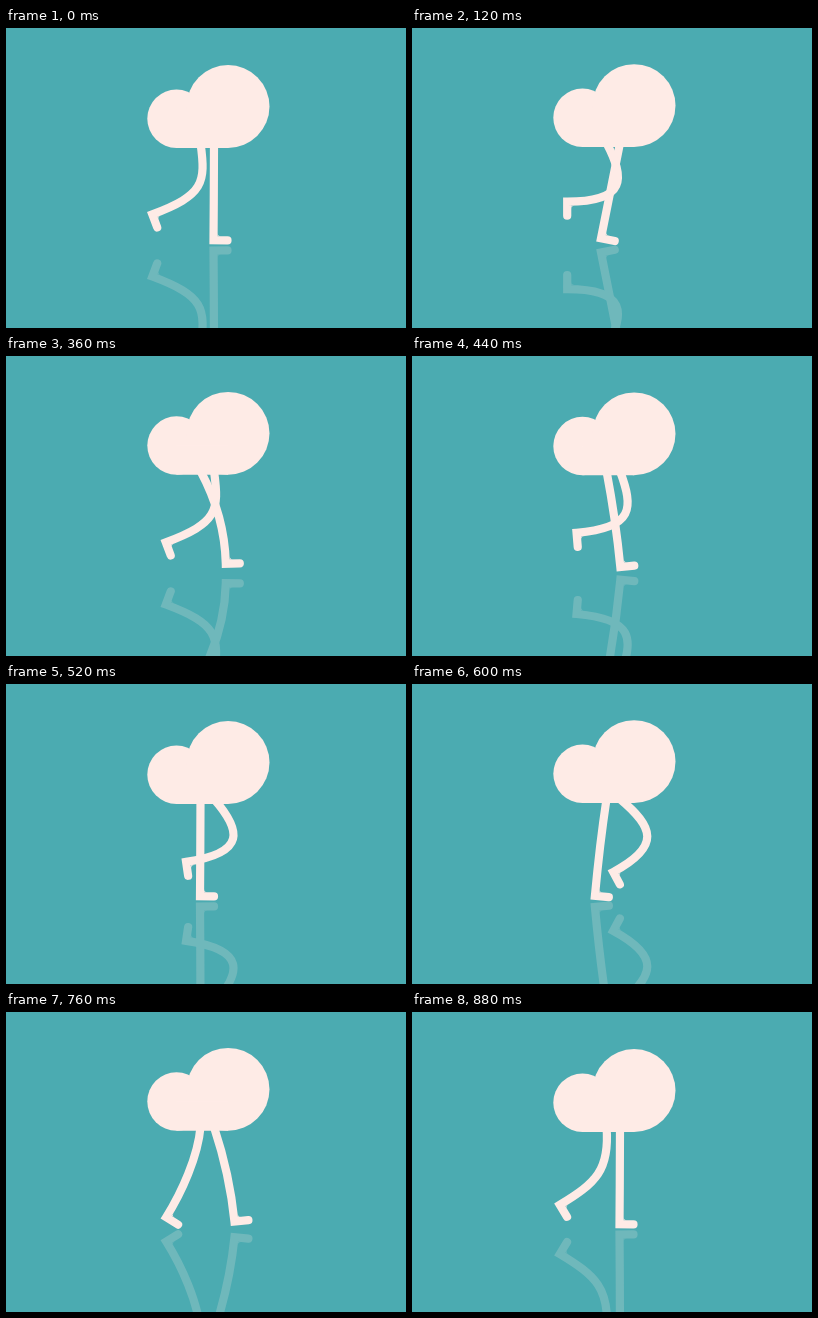
Write an HTML page that moves like this. It is 400x300 px and loops after 920 ms.

```html
<!DOCTYPE html>
<html lang="en">
<head>
<meta charset="utf-8">
<title>Walking cloud</title>
<style>
  html, body { margin: 0; width: 100%; height: 100%; overflow: hidden; background: #4babb1; }
  svg { display: block; width: 100%; height: 100%; }
  .limb { fill: none; stroke: #feebe6; stroke-width: 8.2; stroke-linecap: round; stroke-linejoin: miter; }
  .fill { fill: #feebe6; }
</style>
</head>
<body>
<svg viewBox="0 0 400 300">
  <use href="#legs" transform="translate(0 434.8) scale(1 -1)" opacity=".2"/>
  <g id="legs">
    <path class="limb"/><path class="fill"/>
    <path class="limb"/><path class="fill"/>
  </g>
  <g id="cloud" class="fill">
    <circle cx="170.5" cy="90.7" r="29.2"/>
    <circle cx="222.1" cy="78.5" r="41.4"/>
    <path d="M170.5 91H222V119.9H170.5Z"/>
  </g>
</svg>
<script>
const LOOP = 920, STEP = 40, HIP_Y = 115, HALF = 4.1, TOE = 14, FILLET = 3.2;

// Leg curve relative to the hip: two control points, then the ankle.
const poses = [
  [0, 32, -.3, 65, -.5, 97.3],        // upright
  [-6.3, 32, -12.7, 63.5, -19, 95.3], // leaning back
  [-1, 30, -19, 65, -38.2, 88],       // push off
  [3.5, 43, -10.5, 56, -46.7, 77.8],  // heel up
  [5.5, 40, 3.5, 52, -48.2, 71.3],    // trailing
  [18.5, 35, 20.5, 58.7, -39.3, 58.7],// knee forward
  [27, 31, 33, 54, -27.9, 62.9],
  [33.5, 28, 41.5, 47, -6.8, 73],     // passing
  [30, 25, 40, 45, 15.1, 85.4],       // reaching
  [14.5, 27, 24.5, 57, 25.3, 92.7]    // heel strike
];

// Each key is [time, pose].
const legs = [
  { x: 208, keys: [[0, 0], [120, 1], [240, 2], [320, 3], [360, 4], [480, 5], [520, 6],
                   [600, 7], [680, 8], [720, 9], [880, 0]] },
  { x: 194.5, keys: [[0, 4], [120, 5], [160, 6], [240, 7], [320, 8], [360, 9],
                     [520, 0], [655, 1], [790, 2], [880, 3]] }
];

const paths = document.querySelectorAll('#legs path');
const cloud = document.getElementById('cloud');

// Cyclic cubic interpolation between neighbouring poses.
function poseAt(keys, t) {
  const n = keys.length;
  const key = i => {
    const [time, pose] = keys[(i + n) % n];
    return [time + LOOP * Math.floor(i / n), poses[pose]];
  };
  let i = n - 1;
  while (keys[i][0] > t) i--;
  const [[t0, a], [t1, b], [t2, c], [t3, d]] = [-1, 0, 1, 2].map(k => key(i + k));
  const span = t2 - t1, u = (t - t1) / span, v = 1 - u;
  return b.map((p, j) => {
    const m1 = (c[j] - a[j]) / (t2 - t0) * span;
    const m2 = (d[j] - p) / (t3 - t1) * span;
    return p * (1 + 2 * u) * v * v + m1 * u * v * v
         + c[j] * u * u * (3 - 2 * u) - m2 * u * u * v;
  });
}

function drawLeg(leg, i, t) {
  const [ax, ay, bx, by, ex, ey] = poseAt(leg.keys, t)
    .map((p, j) => p + (j % 2 ? HIP_Y : leg.x));
  const len = Math.hypot(ex - bx, ey - by);
  const dx = (ex - bx) / len, dy = (ey - by) / len;
  // Point given along the foot and up the shin, which meet at a right angle.
  const at = (foot, shin) =>
    `${(ex + foot * dy - shin * dx).toFixed(2)} ${(ey - foot * dx - shin * dy).toFixed(2)}`;
  paths[2 * i].setAttribute('d',
    `M${leg.x} ${HIP_Y}C${ax} ${ay} ${bx} ${by} ${ex} ${ey}L${at(TOE, 0)}`);
  const corner = at(HALF, HALF);
  paths[2 * i + 1].setAttribute('d',
    `M${corner}L${at(HALF + FILLET, HALF)}Q${corner} ${at(HALF, HALF + FILLET)}Z`);
}

function bob(t) {
  const u = t < 520 ? t / 520 : Math.min((t - 520) / 360, 1);
  return -1.4 * Math.sin(Math.PI * u);
}

function draw(now) {
  const t = Math.floor(now % LOOP / STEP) * STEP;
  legs.forEach((leg, i) => drawLeg(leg, i, t));
  cloud.setAttribute('transform', `translate(0 ${bob(t).toFixed(2)})`);
}

const start = performance.now();
function tick() {
  draw(performance.now() - start);
  requestAnimationFrame(tick);
}
tick();
</script>
</body>
</html>
```
